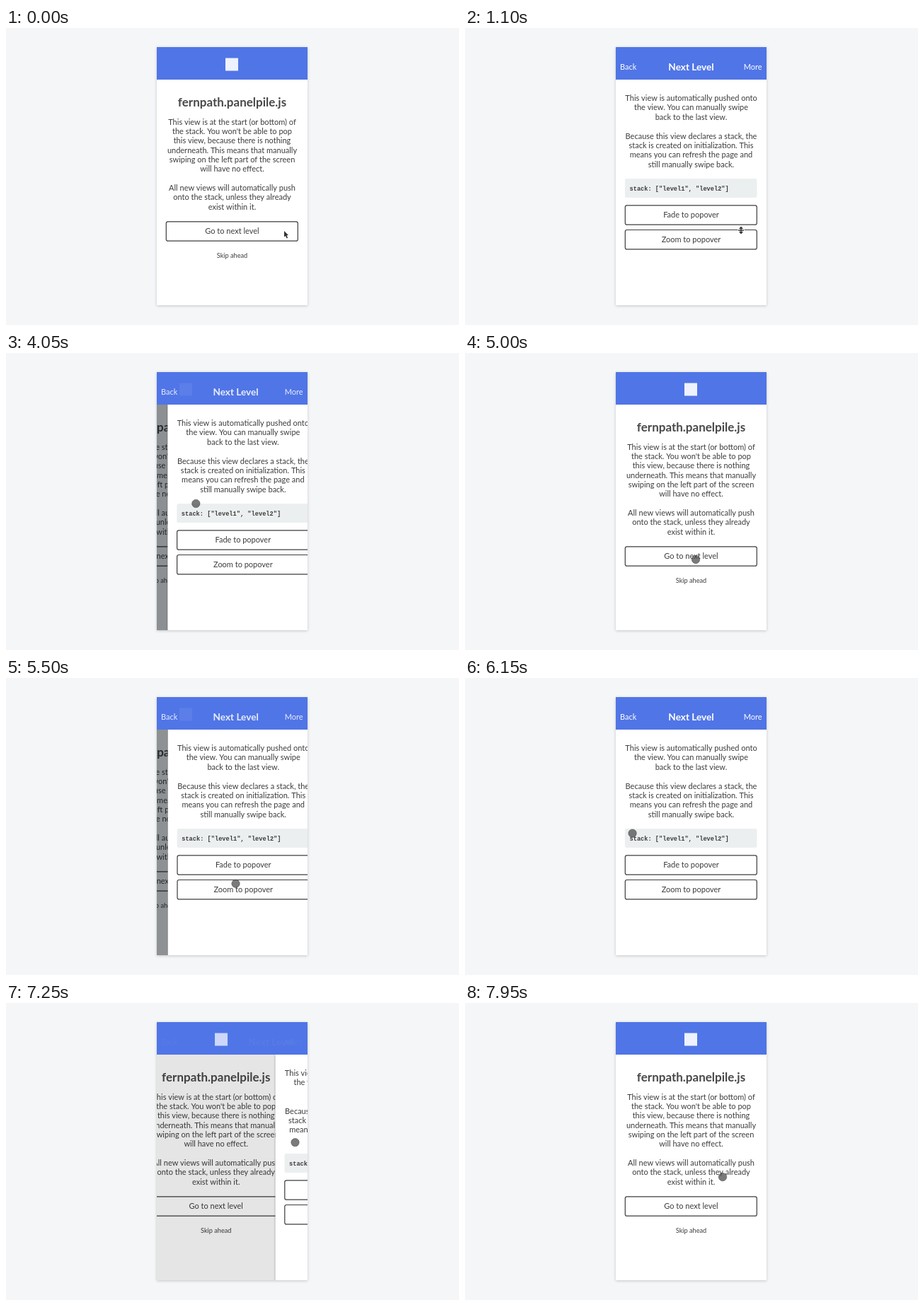
Write an HTML page with a canvas that moves like this. It is 640 px wide and 420 px high and loops after 8000 ms.

```html
<!DOCTYPE html>
<html lang="en">
<head>
<meta charset="utf-8">
<title>View stack</title>
<style>
html, body { margin: 0; width: 640px; height: 420px; overflow: hidden; background: #f4f6f8; }
canvas { display: block; }
</style>
</head>
<body>
<canvas id="stage" width="640" height="420"></canvas>
<script>
const ctx = document.getElementById('stage').getContext('2d');
const LOOP = 8000, STEP = 50;
const PHONE = { x: 213, y: 27, w: 213, h: 365 };
const MID = 319.5, HEADER_END = 73, LINE = 13.37;
const INK = '#3c3c3c', BLUE = '#5075e6';
const SANS = 'Lato, sans-serif', MONO = '"Liberation Mono", monospace';

const clamp = v => Math.max(0, Math.min(1, v));
const mix = (a, b, k) => a + (b - a) * k;
const span = (t, a, b) => clamp((t - a) / (b - a));
const smooth = k => k * k * (3 - 2 * k);
const easeOut = k => 1 - Math.pow(1 - k, 3);

// Pointer stops: time, x, y. Each leg is eased.
const PATH = [
  [1750, 390, 286], [2100, 395, 252], [3000, 395, 252], [3600, 231, 215],
  [3925, 231, 215], [4350, 410, 205], [4420, 410, 205], [4850, 326, 292],
  [5450, 326, 292], [6100, 239, 222], [6125, 237, 220], [6400, 219, 203],
  [6675, 219, 203], [7300, 412, 197], [7525, 412, 197], [7950, 364, 246]
];

function pointerAt(t) {
  let i = 0;
  while (i < PATH.length - 2 && t >= PATH[i + 1][0]) i++;
  const [t0, x0, y0] = PATH[i], [t1, x1, y1] = PATH[i + 1];
  const k = smooth(span(t, t0, t1));
  return { x: mix(x0, x1, k), y: mix(y0, y1, k) };
}

function dragAt(t, grab, release, end) {
  const pull = time => Math.max(0, pointerAt(time).x - grab);
  return t < release ? pull(t) : mix(pull(release), PHONE.w, easeOut(span(t, release, end)));
}

// Left offset of the upper view: 0 is fully open, PHONE.w is off screen.
function offsetAt(t) {
  const push = start => PHONE.w * (1 - smooth(easeOut(span(t, start, start + 500))));
  if (t < 3900) return push(275);
  if (t < 5200) return dragAt(t, 253, 4350, 4750);
  if (t < 6600) return push(5275);
  return dragAt(t, 241, 7260, 7500);
}

function text(str, x, y, size, opt = {}) {
  ctx.font = `${opt.weight || 400} ${size}px ${opt.face || SANS}`;
  ctx.textAlign = opt.align || 'center';
  ctx.fillStyle = opt.color || INK;
  ctx.fillText(str, x, y);
}

function lines(list, y) {
  list.forEach((str, i) => text(str, MID, y + i * LINE, 11));
}

function box(x, y, w, h, r) {
  ctx.beginPath();
  ctx.roundRect(x, y, w, h, r);
}

function button(label, y) {
  box(226.3, y, 186, 27.4, 2.5);
  ctx.strokeStyle = INK;
  ctx.lineWidth = 1.2;
  ctx.stroke();
  text(label, MID, y + 17, 11);
}

function drawStart() {
  text('fernpath.panelpile.js', MID + 14 - 14, 111, 17, { weight: 700, color: '#484848' });
  lines([
    'This view is at the start (or bottom) of',
    "the stack. You won't be able to pop",
    'this view, because there is nothing',
    'underneath. This means that manually',
    'swiping on the left part of the screen',
    'will have no effect.'
  ], 136.5);
  lines([
    'All new views will automatically push',
    'onto the stack, unless they already',
    'exist within it.'
  ], 230);
  button('Go to next level', 273.8);
  text('Skip ahead', MID, 325, 9.2);
}

function drawNext() {
  ctx.save();
  ctx.shadowColor = 'rgba(0,0,0,.3)';
  ctx.shadowBlur = 2;
  ctx.fillStyle = '#fff';
  ctx.fillRect(PHONE.x, HEADER_END, PHONE.w, 340);
  ctx.restore();
  lines([
    'This view is automatically pushed onto',
    'the view. You can manually swipe',
    'back to the last view.'
  ], 103);
  lines([
    'Because this view declares a stack, the',
    'stack is created on initialization. This',
    'means you can refresh the page and',
    'still manually swipe back.'
  ], 156.5);
  box(226, 213, 186.5, 27, 2.5);
  ctx.fillStyle = '#eceff0';
  ctx.fill();
  text('stack: ["level1", "level2"]', 232.5, 229.5, 8.67, { weight: 700, face: MONO, align: 'left' });
  button('Fade to popover', 250.8);
  button('Zoom to popover', 285.5);
}

function drawHeader(p) {
  ctx.fillStyle = BLUE;
  ctx.fillRect(PHONE.x, PHONE.y, PHONE.w, HEADER_END - PHONE.y);
  ctx.globalAlpha = p;
  ctx.fillStyle = '#eef2ff';
  ctx.fillRect(310 - 70 * (1 - p), 42.5, 18, 18);
  ctx.globalAlpha = (1 - p) * (1 - p);
  const white = { color: '#fff' };
  text('Next Level', MID + 70 * p, 59.5, 13.6, { weight: 700, ...white });
  text('Back', 219, 59, 11, { align: 'left', ...white });
  text('More', 419.5, 59, 11, { align: 'right', ...white });
  ctx.globalAlpha = 1;
}

function shape(x, y, pts, fill) {
  ctx.beginPath();
  for (let i = 0; i < pts.length; i += 2) ctx.lineTo(x + pts[i], y + pts[i + 1]);
  ctx.closePath();
  ctx.strokeStyle = '#fff';
  ctx.lineWidth = 1.4;
  ctx.stroke();
  ctx.fillStyle = fill;
  ctx.fill();
}

function drawPointer(t) {
  if (t < 1050) {
    shape(393, 287, [0, 0, 0, 8.6, 2, 6.9, 3.6, 10.4, 5.1, 9.7, 3.6, 6.3, 6, 6], '#333');
    return;
  }
  if (t < 1800) {
    shape(390, 286, [0, -5.5, 3, -2, .7, -2, .7, -.7, 4, -.7, 4, .7, .7, .7, .7, 2, 3, 2,
      0, 5.5, -3, 2, -.7, 2, -.7, .7, -4, .7, -4, -.7, -.7, -.7, -.7, -2, -3, -2], '#333');
    return;
  }
  const { x, y } = pointerAt(t);
  ctx.beginPath();
  ctx.arc(x, y, 5.7, 0, Math.PI * 2);
  ctx.fillStyle = 'rgba(70,70,70,.72)';
  ctx.fill();
  ctx.strokeStyle = 'rgba(60,60,60,.5)';
  ctx.lineWidth = 1;
  ctx.stroke();
}

function draw(t) {
  const off = offsetAt(t), p = off / PHONE.w;
  ctx.fillStyle = '#f4f6f8';
  ctx.fillRect(0, 0, 640, 420);

  ctx.save();
  ctx.shadowColor = 'rgba(0,0,0,.2)';
  ctx.shadowBlur = 4;
  ctx.shadowOffsetY = 1;
  ctx.fillStyle = '#fff';
  ctx.fillRect(PHONE.x, PHONE.y, PHONE.w, PHONE.h);
  ctx.restore();

  ctx.save();
  ctx.beginPath();
  ctx.rect(PHONE.x, PHONE.y, PHONE.w, PHONE.h);
  ctx.clip();
  if (p > 0) {
    ctx.save();
    ctx.translate(-(PHONE.w - off) / 2, 0);
    drawStart();
    ctx.restore();
    ctx.fillStyle = `rgba(0,8,12,${(1 - p) * .48})`;
    ctx.fillRect(PHONE.x, HEADER_END, PHONE.w, 340);
  }
  if (p < 1) {
    ctx.save();
    ctx.translate(off, 0);
    drawNext();
    ctx.restore();
  }
  drawHeader(p);
  ctx.restore();
  drawPointer(t);
}

function tick() {
  const t = performance.now() % LOOP;
  draw(Math.floor(t / STEP) * STEP);
  requestAnimationFrame(tick);
}
tick();
</script>
</body>
</html>
```
